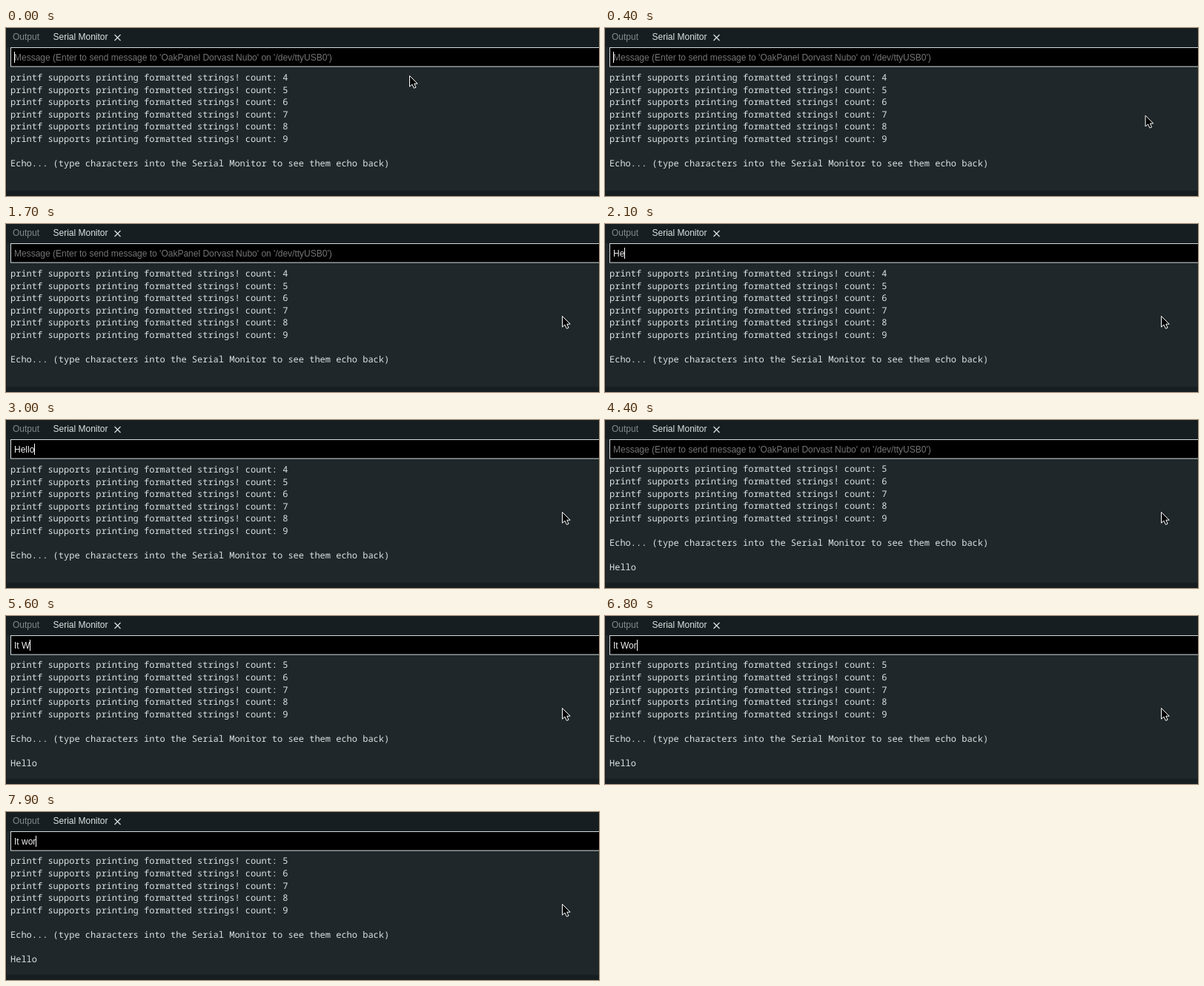
These frames come from a looping animation (800 by 227 pixels, 8 s). An HTML page:

```html
<!DOCTYPE html>
<html lang="en">
<head>
<meta charset="utf-8">
<title>Serial Monitor echo</title>
<style>
  html, body { margin: 0; width: 100%; height: 100%; overflow: hidden; background: #171e21; }
  svg { display: block; width: 100%; height: 100%; }
  text { font: 12px "Liberation Sans", Arial, sans-serif; fill: #dae3e3; white-space: pre; }
  #log text { font-family: "Noto Sans Mono", monospace; text-rendering: geometricPrecision; }
  #hint { fill: #757575; }
  #typed { fill: #f0f0f0; }
  .idle { fill: #828a8c; }
</style>
</head>
<body>
<svg viewBox="0 0 800 227">
  <rect width="800" height="227" fill="#171e21"/>
  <rect x="1" y="26" width="799" height="194" fill="#1f272a"/>

  <text class="idle" x="9" y="16">Output</text>
  <text x="63.5" y="16">Serial Monitor</text>
  <path d="M146.5 9l8 8m0-8l-8 8" stroke="#dae3e3" stroke-width="1.2"/>

  <rect x="6.5" y="26.5" width="810" height="25.6" fill="#000" stroke="#d6dcdc"/>
  <text id="hint" x="11" y="44">Message (Enter to send message to 'OakPanel Dorvast Nubo' on '/dev/ttyUSB0')</text>
  <text id="typed" x="11" y="44"></text>
  <rect id="caret" y="32" width="1" height="15" fill="#fff"/>

  <g id="log"></g>
  <path id="mouse" d="M.5 .5V15.2L4 12.2L6.4 17.3L9 16.2L6.8 11.2H11.2Z"
        fill="#000" stroke="#fff" stroke-linejoin="round"/>
</svg>
<script>
const LOOP = 8000, SEND = 3100;
const $ = id => document.getElementById(id);

// [start ms, typed text, caret visible]
const steps = [
  [0, "", 1], [500, "", 0], [1000, "", 1], [1600, "", 0],
  [1900, "H", 1], [2000, "He", 1], [2300, "Hel", 1], [2400, "Hell", 1], [2600, "Hello", 1],
  [SEND, "", 1], [3200, "", 0], [3800, "", 1], [4400, "", 0],
  [4900, "I", 1], [5200, "It", 1], [5300, "It ", 1], [5600, "It W", 1], [5700, "It Wo", 1],
  [5900, "It Wor", 1], [6000, "It Work", 1], [6700, "It Work", 0],
  [6800, "It Wor", 1], [6900, "It Wo", 0], [7100, "It W", 0], [7300, "It ", 1],
  [7600, "It w", 1], [7800, "It wo", 1], [7900, "It wor", 1]
];

const counts = [4, 5, 6, 7, 8, 9].map(n => `printf supports printing formatted strings! count: ${n}`);
const echo = "Echo... (type characters into the Serial Monitor to see them echo back)";
const before = [...counts, "", echo];
const after = [...counts.slice(1), "", echo, "", "Hello"];

function showLog(lines, top) {
  $("log").replaceChildren(...lines.map((line, i) => {
    const t = document.createElementNS("http://www.w3.org/2000/svg", "text");
    t.setAttribute("x", 6);
    t.setAttribute("y", Math.round(top + i * 16.6));
    t.textContent = line;
    return t;
  }));
}

// The pointer moves in 100 ms steps and comes to rest at 500 ms.
function moveMouse(ms) {
  const p = Math.min(Math.floor(ms / 100) / 5, 1);
  const e = p * p * (3 - 2 * p);
  $("mouse").setAttribute("transform", `translate(${544 + 206 * e} ${64 + 60 * e})`);
}

let shown = null, sent = null;
function draw(ms) {
  const step = steps.findLast(s => s[0] <= ms);
  if (step !== shown) {
    shown = step;
    const [, text, on] = step;
    $("typed").textContent = text;
    $("hint").style.display = text ? "none" : "";
    $("caret").style.display = on ? "" : "none";
    const width = text ? $("typed").getComputedTextLength() : 0;
    $("caret").setAttribute("x", Math.round(11 + width));
  }
  const isSent = ms >= SEND;
  if (isSent !== sent) {
    sent = isSent;
    if (sent) showLog(after, 70.4);
    else showLog(before, 71);
  }
  moveMouse(ms);
}

const start = performance.now();
function tick() {
  draw((performance.now() - start) % LOOP);
  requestAnimationFrame(tick);
}
tick();
</script>
</body>
</html>
```
